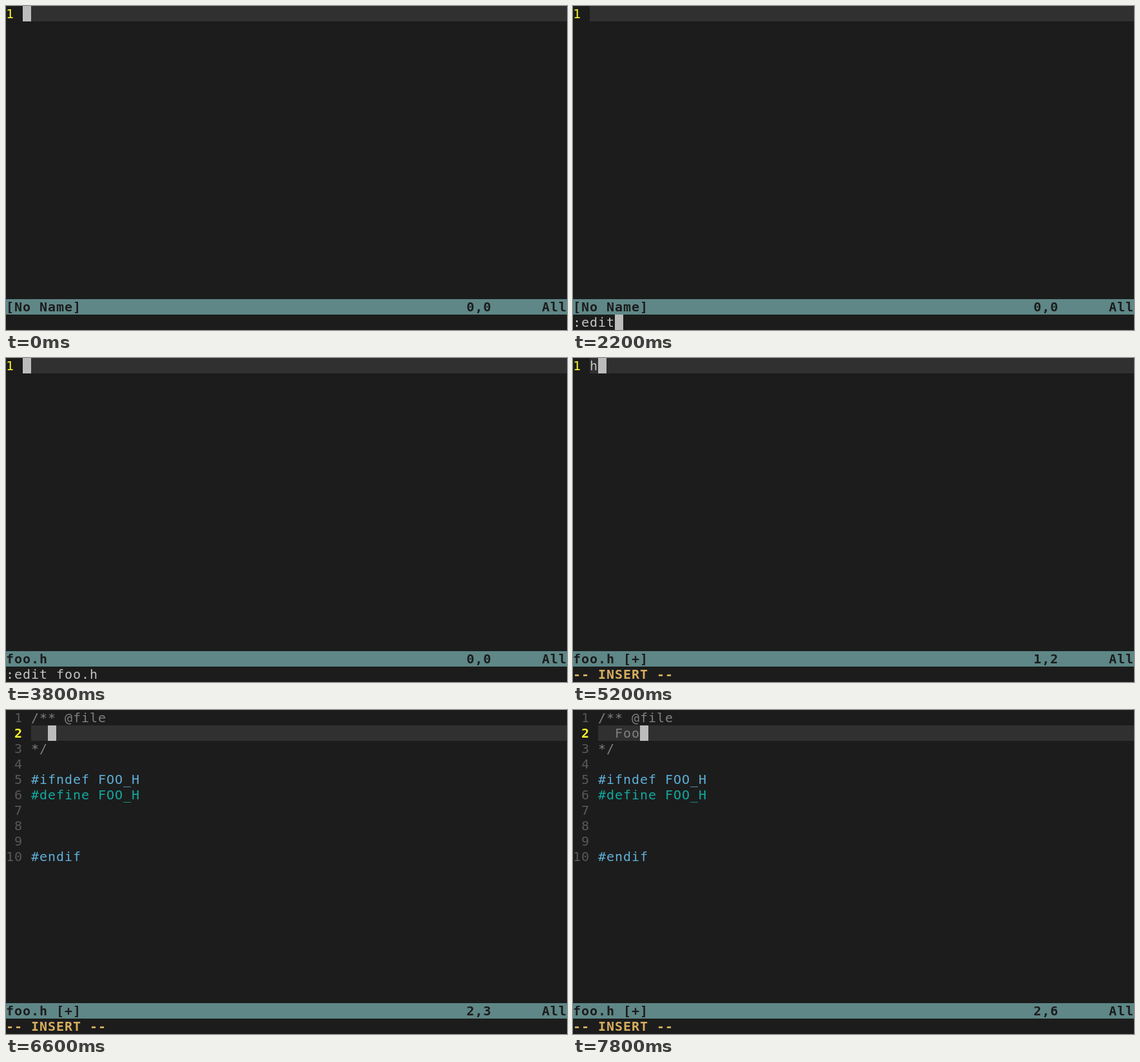
Animation, 871 px wide and 504 px high, one loop 8000 ms. Source, as an HTML page with a canvas:

```html
<!DOCTYPE html>
<html lang="en">
<head>
<meta charset="utf-8">
<title>Editor session</title>
<style>
html, body { margin: 0; width: 100%; height: 100%; overflow: hidden; background: #1c1c1c; }
canvas { display: block; width: 871px; height: 504px; }
</style>
</head>
<body>
<canvas id="screen" width="871" height="504"></canvas>
<script>
const ctx = document.getElementById('screen').getContext('2d');
const W = 871, H = 504, CELL = 13, ROW = 24, BASE = 19, LOOP = 8000;
const STATUS_ROW = 19, CMD_ROW = 20;
const color = {
  bg: '#1c1c1c', line: '#303030', status: '#5f8787', cursor: '#bcbcbc', text: '#c4c4c4',
  current: '#f5f52c', number: '#585858', comment: '#808080',
  guard: '#5fafd7', define: '#12a9a1', mode: '#d7af5f'
};

// Times at which each further character appears
const command = { text: ':edit foo.h', times: [600, 1400, 1800, 2000, 2200, 2400, 2600, 2800, 3000, 3200, 3400] };
const trigger = { text: 'head', times: [5200, 5600, 5800, 6000] };
const summary = { text: 'Foo', times: [7200, 7600, 7800] };
const OPEN = 3800, INSERT = 4400, EXPAND = 6600;

const template = [
  ['/** @file', color.comment], ['', color.comment], ['*/', color.comment], ['', color.text],
  ['#ifndef FOO_H', color.guard], ['#define FOO_H', color.define],
  ['', color.text], ['', color.text], ['', color.text], ['#endif', color.guard]
];

const typed = (entry, t) => entry.text.slice(0, entry.times.filter(at => at <= t).length);

function fill(x, y, w, h, c) {
  ctx.fillStyle = c;
  ctx.fillRect(x, y, w, h);
}

function write(text, col, row, c, bold) {
  ctx.font = (bold ? 'bold ' : '') + '20px "DejaVu Sans Mono", monospace';
  ctx.fillStyle = c;
  [...text].forEach((ch, i) => ctx.fillText(ch, (col + i) * CELL, row * ROW + BASE));
}

const cursor = (col, row) => fill(col * CELL, row * ROW, CELL, ROW, color.cursor);

function highlight(col, row) {
  fill(col * CELL, row * ROW, W - col * CELL, ROW, color.line);
}

function drawStatus(name, position) {
  fill(0, STATUS_ROW * ROW, W, ROW, color.status);
  write(name, 0, STATUS_ROW, color.bg, true);
  write(position, 55, STATUS_ROW, color.bg, true);
  write('All', 64, STATUS_ROW, color.bg, true);
}

function drawSingleLine(t) {
  const word = typed(trigger, t);
  const cmd = typed(command, t);
  const inserting = t >= INSERT;
  highlight(2, 0);
  write('1', 0, 0, color.current);
  write(word, 2, 0, color.text);
  const name = t < OPEN ? '[No Name]' : word ? 'foo.h [+]' : 'foo.h';
  drawStatus(name, (word ? 1 : 0) + ',' + (inserting ? word.length + 1 : 0));
  if (!inserting) write(cmd, 0, CMD_ROW, color.text);
  if (cmd && t < OPEN) cursor(cmd.length, CMD_ROW);
  else cursor(2 + word.length, 0);
}

function drawTemplate(t) {
  const word = typed(summary, t);
  highlight(3, 1);
  template.forEach(([text, c], row) => {
    const active = row === 1;
    write(String(row + 1).padStart(2), 0, row, active ? color.current : color.number, active);
    write(active ? '  ' + word : text, 3, row, c);
  });
  cursor(5 + word.length, 1);
  drawStatus('foo.h [+]', '2,' + (word.length + 3));
}

function draw(t) {
  fill(0, 0, W, H, color.bg);
  if (t < EXPAND) drawSingleLine(t);
  else drawTemplate(t);
  if (t >= INSERT) write('-- INSERT --', 0, CMD_ROW, color.mode, true);
}

const start = performance.now();
function tick() {
  draw((performance.now() - start) % LOOP);
  requestAnimationFrame(tick);
}
tick();
</script>
</body>
</html>
```
